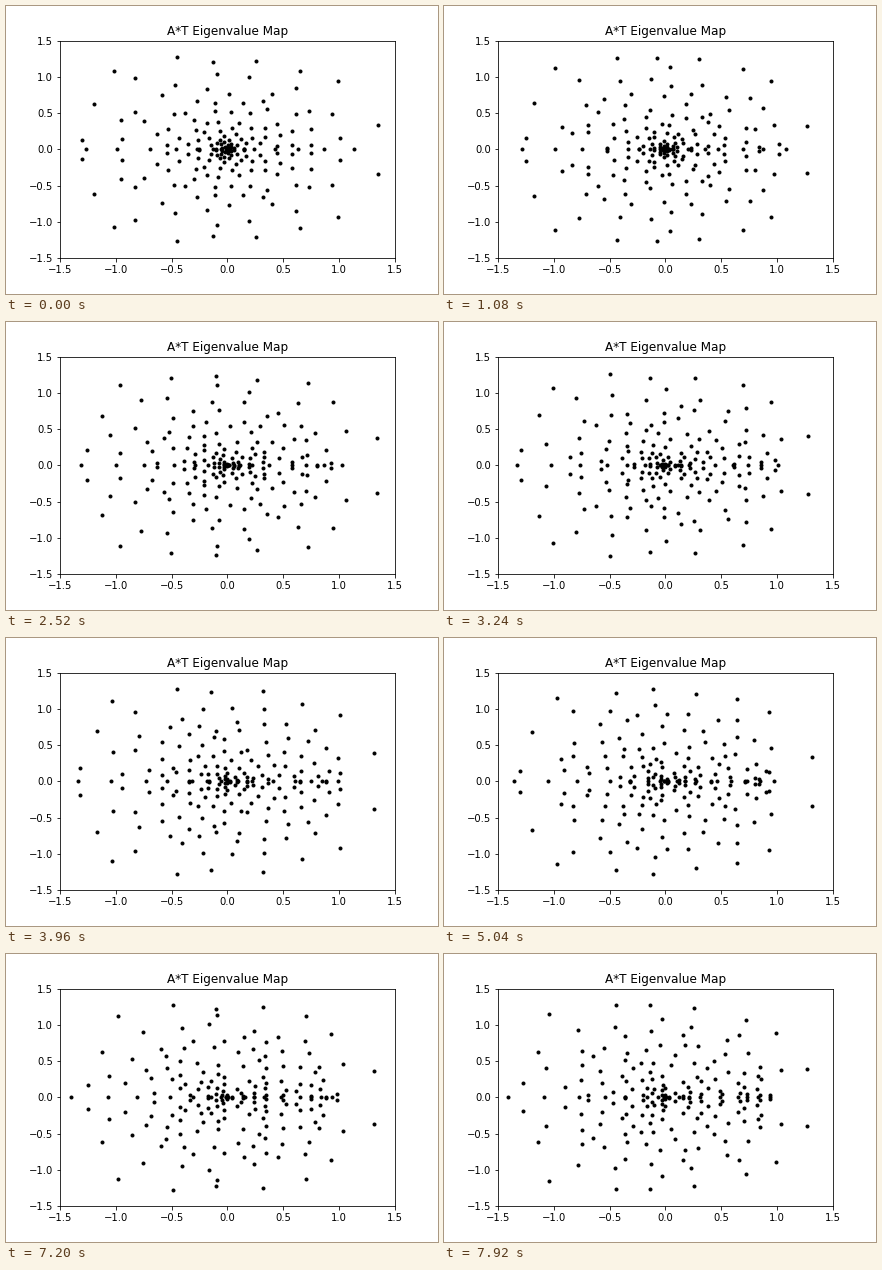
A matplotlib script that plays this animation: 432 by 288 pixels, repeating every 8 s.

```python
import numpy as np
import matplotlib.pyplot as plt
from matplotlib.animation import FuncAnimation

plt.rcParams["text.kerning_factor"] = 6

FRAMES, HOLD = 200, 9            # 40 ms ticks, a new state every 360 ms
LAST = (FRAMES - 1) // HOLD
PAIRS, REALS = 80, 15
HUB = 0.82                       # where the right half gathers
rng = np.random.default_rng(12)

# Steady outer eigenvalues, upper half
RIM = np.array([-1.16 + 0.66j, -1 + 1.11j, -1.28 + 0.17j, -0.8 + 0.94j,
                -0.47 + 1.24j, -0.11 + 1.24j, 0.29 + 1.21j, 0.68 + 1.1j,
                0.97 + 0.91j, 1.31 + 0.36j])

RANK = (np.arange(PAIRS) + 0.7) / PAIRS
ANGLE = np.pi * ((np.arange(PAIRS) * 0.618034 + 0.3) % 1)


def make_sway(n):
    """Smooth seeded wandering of n points in the plane."""
    rate = rng.uniform(1, 4, (2, n))
    phase = rng.uniform(0, 2 * np.pi, (2, n))

    def sway(u):
        x, y = np.sin(2 * np.pi * rate * u + phase)
        return x + 1j * y
    return sway


rim_sway, core_sway, real_sway = map(make_sway, (len(RIM), PAIRS, REALS))


def gather(z, e):
    """Draw the right half near the axis towards the hub."""
    x, y = z.real, z.imag
    near = e * np.exp(-(y / 0.6) ** 2)
    x = np.where(x > 0, np.abs(x) ** (1 / (1 + 0.6 * near)), x)
    d = x + 1j * y - HUB
    return HUB + d * (1 - 0.45 * e * np.exp(-np.abs(d) ** 2 / 0.15))


def core(u, e):
    """Sunflower disc, dense in the centre at first."""
    r = 1.1 * RANK ** (1.45 - 0.4 * e)
    z = r * np.exp(1j * ANGLE) + 0.07 * r ** 0.8 * core_sway(u)
    return gather(z.real + 1j * np.abs(z.imag), e)


def reals(u, e):
    t = np.linspace(-1, 1, REALS)
    reach = np.where(t < 0, 1.27 + 0.14 * u, 1.13 - 0.13 * u)
    inner = 1 - np.abs(t)
    x = reach * np.sign(t) * np.abs(t) ** 1.7
    x = x + 0.12 * inner * np.abs(t) * real_sway(u).real
    return gather(x + 0j, e)


def spectrum(u):
    e = 1 - (1 - u) ** 2
    upper = np.concatenate([RIM + 0.04 * rim_sway(u), core(u, e)])
    return np.concatenate([upper, upper.conj(), reals(u, e)])


fig = plt.figure(figsize=(6, 4), dpi=72, facecolor="white")
ax = fig.add_axes([0.125, 0.125, 0.775, 0.755])
ax.set(xlim=(-1.5, 1.5), ylim=(-1.5, 1.5))
ax.set_xticks(np.arange(-1.5, 1.6, 0.5))
ax.set_yticks(np.arange(-1.5, 1.6, 0.5))
ax.set_title("A*T Eigenvalue Map")
dots, = ax.plot([], [], "k.")


def update(i):
    z = spectrum(i // HOLD / LAST)
    dots.set_data(z.real, z.imag)
    return dots,


anim = FuncAnimation(fig, update, frames=FRAMES, interval=1000 // 25,
                     repeat=True, repeat_delay=0)
plt.show()
```
